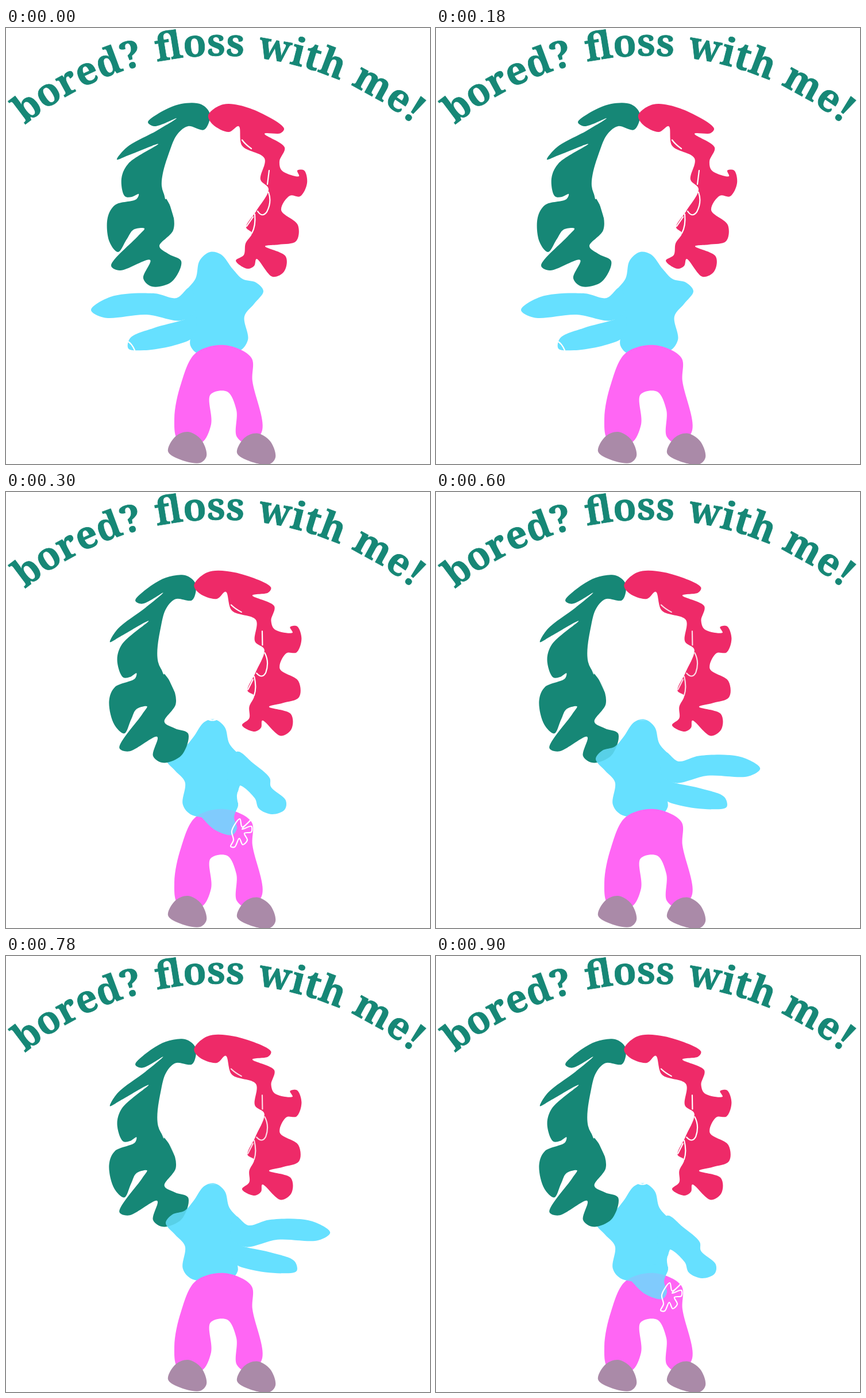
An HTML page for the animation above (1200 ms loop, 738 by 759 pixels).

```html
<!DOCTYPE html>
<html lang="en">
<head>
<meta charset="utf-8">
<title>Floss with me</title>
<style>
  html, body { margin: 0; width: 100%; height: 100%; overflow: hidden; background: #fff; }
  svg { display: block; width: 100%; height: 100%; }
  text { font: 900 66px "Noto Serif", "Liberation Serif", serif; fill: #168776; stroke: #168776; stroke-width: .8; text-anchor: middle; }
  .line { fill: none; stroke: #fff; stroke-width: 2.2; stroke-linecap: round; }
</style>
</head>
<body>
<svg viewBox="0 0 738 759">
  <path id="arc" d="M-163 582A534 534 0 0 1 905 582" fill="none"/>
  <g id="title"></g>
  <g id="dancer"></g>
</svg>
<script>
const GREEN = '#168776', RED = '#ee2a68', BLUE = '#66e0ff', PINK = '#ff66f4', MAUVE = '#aa8aa8';

// Closed centripetal spline through a few key points: "x,y x,y ..."
function curve(points) {
  const p = points.trim().split(/\s+/).map(s => s.split(',').map(Number));
  const at = i => p[(i + p.length) % p.length];
  const knot = i => Math.sqrt(Math.hypot(at(i + 1)[0] - at(i)[0], at(i + 1)[1] - at(i)[1]));
  const handle = (i, side) => {
    const a = knot(i - 1), b = knot(i), reach = side > 0 ? b / 3 : -a / 3;
    return at(i).map((v, k) => {
      const from = at(i - 1)[k], to = at(i + 1)[k];
      return v + reach * ((v - from) / a - (to - from) / (a + b) + (to - v) / b);
    });
  };
  return `M${p[0]}${p.map((_, i) => `C${handle(i, 1)} ${handle(i + 1, -1)} ${at(i + 1)}`).join('')}Z`;
}
const blob = (color, points) => `<path fill="${color}" d="${curve(points)}"/>`;
const line = d => `<path class="line" d="${d}"/>`;
const move = (transform, s) => `<g transform="${transform}">${s}</g>`;
const fade = s => `<g opacity=".17">${s}</g>`;

const locks =
  blob(GREEN, `355,150 340,133 305,132 265,149 247,164 258,171 297,157 262,179 210,208 193,229 212,222 265,202
    213,236 201,262 207,293 219,294 231,289 227,298 190,308 177,330 180,372 195,390 210,368 222,351 241,349
    230,362 183,414 198,422 251,404 239,436 254,450 288,442 305,406 284,394 267,380 291,352 290,320 271,275
    286,211 299,184 317,171 345,177`) +
  blob(RED, `352,152 378,133 425,140 484,175 478,183 450,184 485,208 476,232 480,248 510,258 507,248 519,248
    524,270 512,293 494,292 479,317 508,343 505,371 475,377 451,380 487,398 484,424 464,433 436,402 432,414
    420,419 400,405 414,395 417,375 428,357 418,347 436,318 457,280 443,264 450,227 411,205 405,171 388,181 360,168`);
const hair = locks +
  line('M411 195Q417 203 427 210M458 248L455 272M457 286Q463 303 454 320Q446 331 438 319') +
  line('M433 324Q435 344 428 357M430 329L419 345M273 275L278 297M286 307L293 330');
const sway = s => move('translate(330 160) rotate(-8.2) translate(-355 -150)', s);

const shoe = blob(MAUVE, '282,737 295,711 317,703 340,717 349,745 338,757 300,750');
const shoes = shoe + move('translate(120 2.5)', shoe);
const trousers = blob(PINK, `330,566 380,552 427,574 429,615 446,700 425,725 402,712 401,665 385,633 356,638
  357,690 340,722 300,718 293,680 305,618`);

const torso = blob(BLUE, `337,405 355,390 374,394 395,420 412,437 435,443 448,458 432,480 415,502 421,543
  405,563 335,567 321,553 321,530 306,490 310,463 330,436`);
const arms =
  blob(BLUE, '320,452 297,470 258,462 182,468 148,491 170,504 245,499 306,509 330,490') +
  blob(BLUE, '330,500 306,509 258,522 216,540 213,558 240,561 298,551 325,538');
const turn = s => move('translate(278 465) rotate(-3) scale(-.95 .95) translate(-448 -458)', s);
const collar = line('M349 394Q359 401 370 394');

const hiddenArm =
  blob(BLUE, '402,452 430,472 459,498 461,513 487,537 485,553 463,561 440,551 433,533 407,511 403,522 385,500') +
  blob(BLUE, '403,540 397,567 402,585 394,597 365,589 344,570 330,550');
const hand = line(curve(`391,617 396,606 393,590 407,569 411,583 426,571 411,587 427,582 427,592 415,594
  420,606 412,614 406,603 398,618`));

const left = hair + torso + arms + line('M211 545Q219 549 224 561') + trousers + shoes;
const behind = trousers + turn(torso) + hiddenArm + collar + sway(hair) + fade(trousers) + hand + shoes;
const right = sway(hair) + turn(torso + arms) + fade(collar + sway(locks)) + trousers + shoes;
const poses = [left, behind, right, behind];

const words = [['bored?', 590], ['floss', 806], ['with', 980], ['me!', 1139]];
document.getElementById('title').innerHTML = words.map(([word, offset]) =>
  `<text><textPath href="#arc" startOffset="${offset}">${word}</textPath></text>`).join('');

const dancer = document.getElementById('dancer');
let shown = -1;
function draw() {
  const step = Math.floor(performance.now() / 300) % poses.length;
  if (step !== shown) dancer.innerHTML = poses[shown = step];
  requestAnimationFrame(draw);
}
draw();
</script>
</body>
</html>
```
